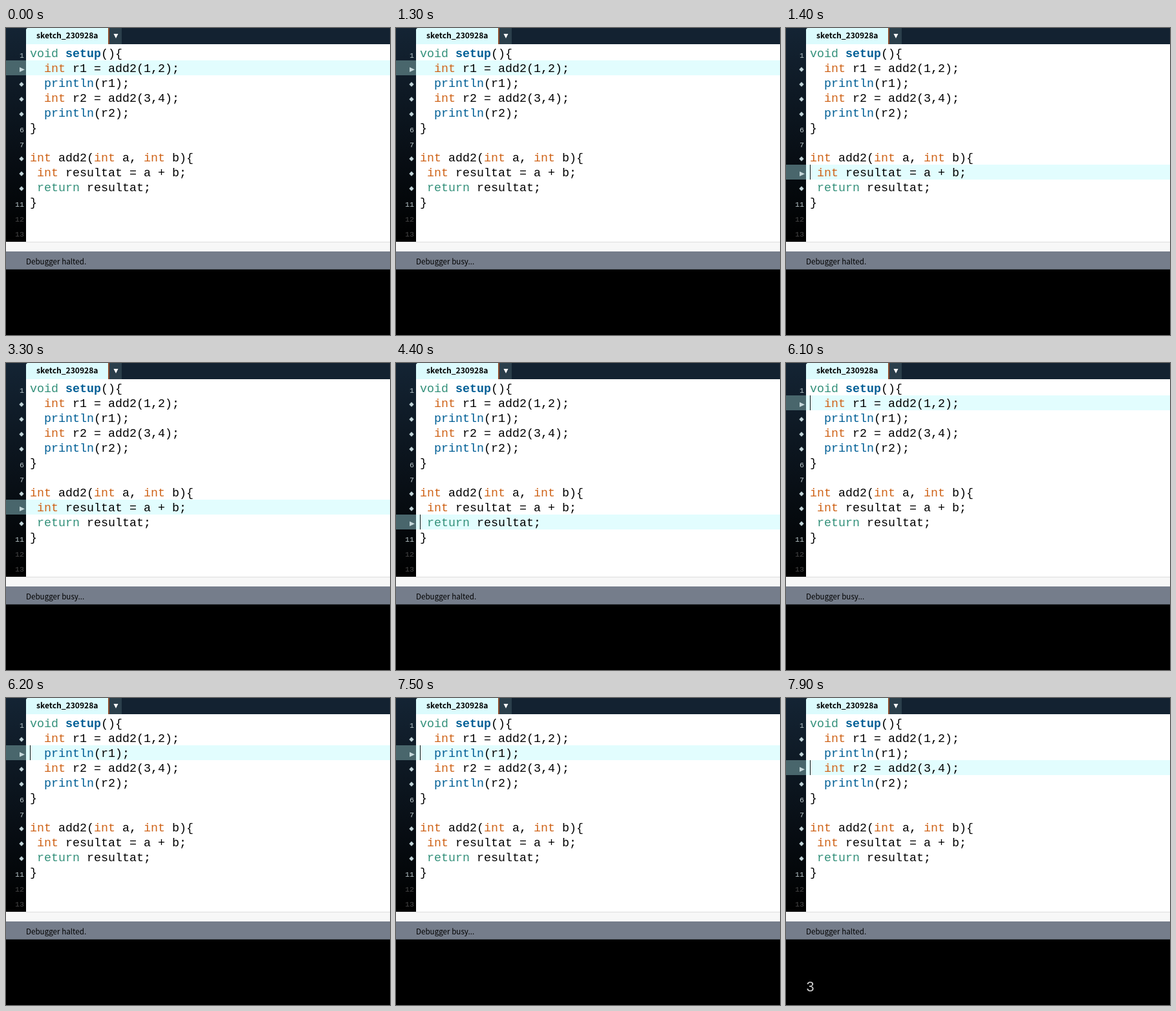
Animation, 594 px wide and 474 px high, one loop 8000 ms. Source, as an HTML page:

```html
<!DOCTYPE html>
<html lang="en">
<head>
<meta charset="utf-8">
<title>Debugger stepping</title>
<style>
  html, body { margin: 0; width: 100%; height: 100%; overflow: hidden; background: #000; }
  svg { display: block; width: 594px; height: 474px; }
  text { white-space: pre; }

  .mono { font-family: "Liberation Mono", "Noto Sans Mono", monospace; }
  .code { font-size: 18.33px; fill: #000; }
  .num { font-size: 11.67px; fill: #b9c6c9; text-anchor: end; }
  .num .dim { fill: #484848; }
  .out { font-size: 21.67px; fill: #ccc; }
  .ui { font: 11.63px "Noto Sans CJK JP", "Noto Sans CJK SC", "Open Sans", sans-serif; }
  .tab { font-size: 12.08px; font-weight: 600; }
  .type { fill: #cf6318; }
  .flow { fill: #33907a; }
  .func { fill: #005f96; }
  .bold { font-weight: 700; }

  .step, .caret, .busy, .halted, .out { animation: 8s step-end infinite; }
  .step { animation-name: step; }
  .caret { animation-name: caret; }
  .busy { animation-name: busy; }
  .halted { animation-name: halted; }
  .out { animation-name: output; }

  @keyframes step {
    0%, 60% { transform: translateY(0); }
    17.5% { transform: translateY(161px); }
    42.5% { transform: translateY(184px); }
    77.5% { transform: translateY(23px); }
    95%, 100% { transform: translateY(46px); }
  }
  @keyframes caret {
    0%, 23.75%, 36.25%, 48.75%, 66.25%, 83.75% { opacity: 0; }
    17.5%, 30%, 42.5%, 55%, 72.5%, 90%, 100% { opacity: 1; }
  }
  @keyframes busy {
    0%, 17.5%, 42.5%, 60%, 77.5%, 95%, 100% { opacity: 0; }
    16.25%, 41.25%, 58.75%, 76.25%, 93.75% { opacity: 1; }
  }
  @keyframes halted {
    0%, 17.5%, 42.5%, 60%, 77.5%, 95%, 100% { opacity: 1; }
    16.25%, 41.25%, 58.75%, 76.25%, 93.75% { opacity: 0; }
  }
  @keyframes output {
    0% { opacity: 0; }
    95%, 100% { opacity: 1; }
  }
</style>
</head>
<body>
<svg viewBox="0 0 594 474">
  <defs>
    <linearGradient id="shade" x1="0" y1="0" x2="0" y2="1">
      <stop offset="0" stop-color="#142434"/>
      <stop offset="1" stop-color="#000"/>
    </linearGradient>
    <path id="diamond" d="M24 -3.7l3.7 3.7l-3.7 3.7l-3.7 -3.7z" fill="#bdd0d4"/>
  </defs>

  <!-- Window -->
  <rect width="594" height="25" fill="#132231"/>
  <rect width="31" height="330" fill="url(#shade)"/>
  <rect x="31" y="25" width="563" height="305" fill="#fff"/>
  <path d="M31 25V2L33 0H158V25z" fill="#dcfbfd"/>
  <rect x="158" width="2" height="25" fill="#8a4a2c"/>
  <rect x="160" width="19" height="25" fill="#2b3f4b"/>
  <path d="M166.5 9h7l-3.5 7z" fill="#fff"/>
  <text class="ui tab" x="47" y="16">sketch_230928a</text>

  <!-- Gutter -->
  <g id="gutter" class="mono num"></g>

  <!-- Current line -->
  <g class="step">
    <rect y="50" width="31" height="23" fill="#49666c"/>
    <rect x="31" y="50" width="563" height="23" fill="#e2fdfe"/>
    <path d="M21 60.5l8 3.7l-8 3.7z" fill="#c3d6d9"/>
    <rect class="caret" x="37" y="50" width="1" height="23" fill="#111"/>
  </g>

  <g class="mono code">
    <text x="37" y="45"><tspan class="flow">void</tspan> <tspan class="func bold">setup</tspan>(){</text>
    <text x="37" y="68">  <tspan class="type">int</tspan> r1 = add2(1,2);</text>
    <text x="37" y="91">  <tspan class="func">println</tspan>(r1);</text>
    <text x="37" y="114">  <tspan class="type">int</tspan> r2 = add2(3,4);</text>
    <text x="37" y="137">  <tspan class="func">println</tspan>(r2);</text>
    <text x="37" y="160">}</text>
    <text x="37" y="206"><tspan class="type">int</tspan> add2(<tspan class="type">int</tspan> a, <tspan class="type">int</tspan> b){</text>
    <text x="37" y="229"> <tspan class="type">int</tspan> resultat = a + b;</text>
    <text x="37" y="252"> <tspan class="flow">return</tspan> resultat;</text>
    <text x="37" y="275">}</text>
  </g>

  <!-- Status bar and console -->
  <rect y="330" width="594" height="15" fill="#f7f7f7"/>
  <rect y="330" width="594" height="1" fill="#dedede"/>
  <rect y="345" width="594" height="28" fill="#757d8b"/>
  <rect y="372" width="594" height="1" fill="#555b66"/>
  <rect y="373" width="594" height="101" fill="#000"/>
  <text class="ui halted" x="31" y="365">Debugger halted.</text>
  <text class="ui busy" x="31" y="365">Debugger busy...</text>
  <text class="mono out" x="31" y="453">3</text>
</svg>
<script>
  const plainLines = [1, 6, 7, 11, 12, 13];
  const marks = Array.from({ length: 13 }, (_, i) => {
    const line = i + 1;
    return plainLines.includes(line)
      ? `<text x="28" y="${46 + 23 * i}" class="${line > 11 ? 'dim' : ''}">${line}</text>`
      : `<use href="#diamond" y="${41 + 23 * i}"/>`;
  });
  document.getElementById('gutter').innerHTML = marks.join('');
</script>
</body>
</html>
```
